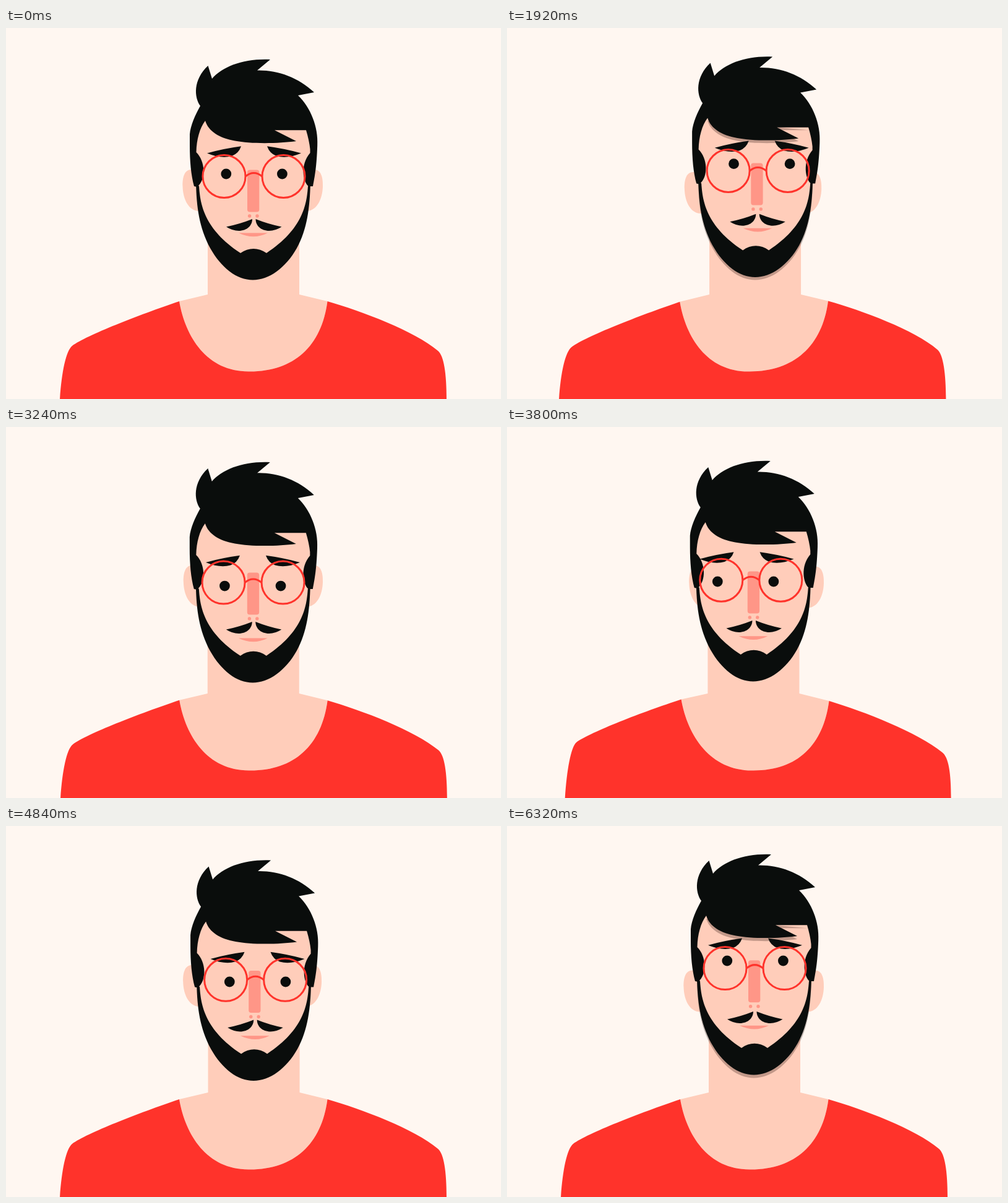
Recreate the animation shown at these times as an HTML page with a canvas. Size 800 by 600 pixels, loop 6.56 s.

```html
<!DOCTYPE html>
<html lang="en">
<head>
<meta charset="utf-8">
<title>Looking around</title>
<style>
html, body { margin: 0; width: 100%; height: 100%; overflow: hidden; background: #fff7f1; }
canvas { display: block; }
</style>
</head>
<body>
<canvas id="stage" width="800" height="600"></canvas>
<script>
const ctx = document.getElementById('stage').getContext('2d');
const BG = '#fff7f1', SKIN = '#ffcdba', INK = '#0a0d0c', RED = '#ff332b', PINK = '#ff9687';
const SHADE = 'rgba(30,10,5,0.27)';
const LOOP = 6560, STEP = 40, LAST = 6320;

// Gaze path: time, pupil shift x, pupil shift y
const gazeKeys = [
  [80, 0, 0], [400, -8.5, 2.5], [760, -18, 1], [880, -18.5, -3],
  [1120, -15, -12], [1440, -2, -23.5], [1520, 1.5, -24], [1800, 9, -20],
  [2120, 12.5, -9], [2360, 14, 0], [2680, 11.5, 10], [2800, 9, 15.5],
  [3120, 1, 21], [3480, -9, 19], [3800, -15.5, 14], [3960, -13.5, 5],
  [4160, -6, -8], [4400, 2, -20.5], [4600, 6, -7], [4840, 5.5, 16],
  [5200, -6, 18], [5560, -15, 9], [5720, -16, 4], [5960, -9, -8],
  [6200, -1, -17], [6320, 0, -18]
];

const shape = d => new Path2D(d);
const fringeEdge = 'L434 165.3L469 183C440 187 395 187.5 370 182.5C345 178 327 167 322 150';
const hair = shape('M304 256C299 238 297 215 297 190L297 172C298 158 306 140 314 126' +
  'C304 112 302 84 326.5 61L333 82C350 62 385 49 427 51L406 68.5C440 68 472 80 498 104L472 109' +
  'C492 128 505 160 503.2 190C502 225 499 240 496 256L489 256C480 249 475 221 491.5 202L491.5 196' +
  'Q490 182 485 165.3' + fringeEdge + 'C313 162 308 180 307.5 201C322 215 324 245 309 257Z');
const fringe = shape('M485 165.3' + fringeEdge + 'Z');
const beard = shape('M307 250C308 290 312 322 330 356C348 388 373 407.5 399 407.5' +
  'C425 407.5 452 388 470 356C487 325 491 290 492 250L488 256C486 285 480 325 421 364' +
  'C408 354.5 392 354.5 379 364C320 325 314 285 312 256Z');
const face = shape('M310 140L490 140L493 200L488 256C484 320 460 385 400 395C340 385 316 320 312 256L306 200Z');
const ear = shape('M299 229C288 229 285 243 285.5 256C286 278 296 296 312 296L325 296L325 229Z');
const brow = shape('M325 202.5Q352 195 380 191.3Q376 203 365 207Q348 212 325 202.5Z');
const whisker = shape('M398 309Q378 317 356 321.5Q366 328 376 328C390 328 398 319 398 309Z');
const mouth = shape('M376 331.5L423 331.5Q400 343 376 331.5Z');
const neck = shape('M326 300L326 431L276 443L290 490L510 490L524 443L474 431L474 300Z');

// Separate rates for negative and positive shifts
const side = (v, neg, pos) => v * (v < 0 ? neg : pos);

function at(dx, dy, draw) {
  ctx.save();
  ctx.translate(dx, dy);
  draw();
  ctx.restore();
}

function fill(path, color) {
  ctx.fillStyle = color;
  ctx.fill(path);
}

function mirrored(path, axis, color) {
  fill(path, color);
  ctx.save();
  ctx.translate(axis * 2, 0);
  ctx.scale(-1, 1);
  fill(path, color);
  ctx.restore();
}

function dot(x, y, r, color) {
  ctx.beginPath();
  ctx.arc(x, y, r, 0, Math.PI * 2);
  ctx.fillStyle = color;
  ctx.fill();
}

function gaze(t) {
  const k = gazeKeys, end = k.length - 1;
  if (t <= k[0][0]) return [0, 0];
  if (t >= k[end][0]) return k[end].slice(1);
  let i = 0;
  while (t >= k[i + 1][0]) i++;
  const a = k[i], b = k[i + 1], h = b[0] - a[0], u = (t - a[0]) / h;
  const slope = (n, c) => {
    if (n === 0 || n === end) return 0;
    return (k[n + 1][c] - k[n - 1][c]) / (k[n + 1][0] - k[n - 1][0]);
  };
  return [1, 2].map(c => {
    const u2 = u * u, u3 = u2 * u;
    return a[c] * (2 * u3 - 3 * u2 + 1) + b[c] * (3 * u2 - 2 * u3) +
      h * (slope(i, c) * (u3 - 2 * u2 + u) + slope(i + 1, c) * (u3 - u2));
  });
}

function drawBody(x) {
  const s = (x < 0 ? -x * 0.43 : -Math.max(0, x - 5.5) * 0.58) / 6.5;
  const p = (px, py, dx, dy) => [px + dx * s, py + dy * s];
  const curve = (a, b, c) => ctx.bezierCurveTo(...a, ...b, ...c);
  const left = p(280, 442, 1.5, -1.5), right = p(519.5, 442, 1, 1);
  const low = p(393, 555.5, 4, 0);
  const collar = () => {
    curve(p(290, 500, 2, 0), p(325, 556, 4, 0), low);
    curve(p(465, 556, 4, 0), p(510, 515, 1, 0), right);
  };

  ctx.fillStyle = SKIN;
  ctx.beginPath();
  ctx.moveTo(...left);
  collar();
  ctx.lineTo(474 + x * 0.1, 431);
  ctx.lineTo(326 + x * 0.1, 431);
  ctx.fill();
  ctx.fillRect(326 + x * 0.1, 300, 148, 132);

  ctx.fillStyle = RED;
  ctx.beginPath();
  ctx.moveTo(...left);
  collar();
  curve(p(575, 458, 2, 2), p(660, 490, 4, 4), p(698, 522, 5, 4));
  curve(p(708, 530, 6, 4), p(712, 560, 5.5, 1), p(712, 601, 5.5, 0));
  ctx.lineTo(...p(87, 601, 6.5, 0));
  curve(p(90, 556, 6.5, -1), p(97, 522, 6, -4), p(107, 514, 5, -4));
  curve(p(130, 497, 6, -4), p(215, 464, 4, -3), left);
  ctx.fill();
}

function drawGlasses() {
  ctx.strokeStyle = RED;
  ctx.lineWidth = 3;
  for (const cx of [352.5, 448.5]) {
    ctx.beginPath();
    ctx.arc(cx, 240, 34.5, 0, Math.PI * 2);
    ctx.stroke();
  }
  ctx.beginPath();
  ctx.moveTo(387, 240);
  ctx.quadraticCurveTo(400.5, 229, 414, 240);
  ctx.stroke();
}

function draw(t) {
  const [x, y] = gaze(t);
  const hx = side(x, 0.08, 0.2), hy = y * 0.28;
  const ny = side(y, 0.68, 0.28);

  ctx.fillStyle = BG;
  ctx.fillRect(0, 0, 800, 600);

  at(side(x, -0.57, 0.13), y * -0.25, () => fill(ear, SKIN));
  at(side(x, 0, -0.35), y * -0.25, () => {
    ctx.translate(797.5, 0);
    ctx.scale(-1, 1);
    fill(ear, SKIN);
  });
  drawBody(x);

  if (hy < 0) at(hx, 0, () => fill(beard, SHADE));
  at(hx, hy, () => fill(face, SKIN));
  if (hy < 0) at(hx, 0, () => fill(fringe, SHADE));
  at(hx, hy, () => {
    fill(beard, INK);
    fill(hair, INK);
  });

  at(side(x, 0.08, 0.4), ny, () => {
    ctx.fillStyle = PINK;
    ctx.beginPath();
    ctx.roundRect(390, 229.5, 19.3, 68, 4);
    ctx.fill();
    dot(393.6, 304, 2.7, PINK);
    dot(406, 304, 2.7, PINK);
  });
  at(side(x, 0.1, 0.52), y * 0.48, () => fill(mouth, PINK));
  at(side(x, 0.1, 0.4), side(y, 0.5, 0.28), () => mirrored(whisker, 400.75, INK));
  at(side(x, 0.87, 1), side(y, 0.54, 0.78), () => mirrored(brow, 401, INK));
  at(x, y, () => {
    dot(355.8, 236, 8.4, INK);
    dot(446.4, 236, 8.4, INK);
  });
  at(side(x, 0.4, 0.48), y * 0.55, drawGlasses);
}

let start = null;
function tick(now) {
  if (start === null) start = now;
  const t = (now - start) % LOOP;
  draw(Math.min(Math.floor(t / STEP) * STEP, LAST));
  requestAnimationFrame(tick);
}
draw(0);
requestAnimationFrame(tick);
</script>
</body>
</html>
```
